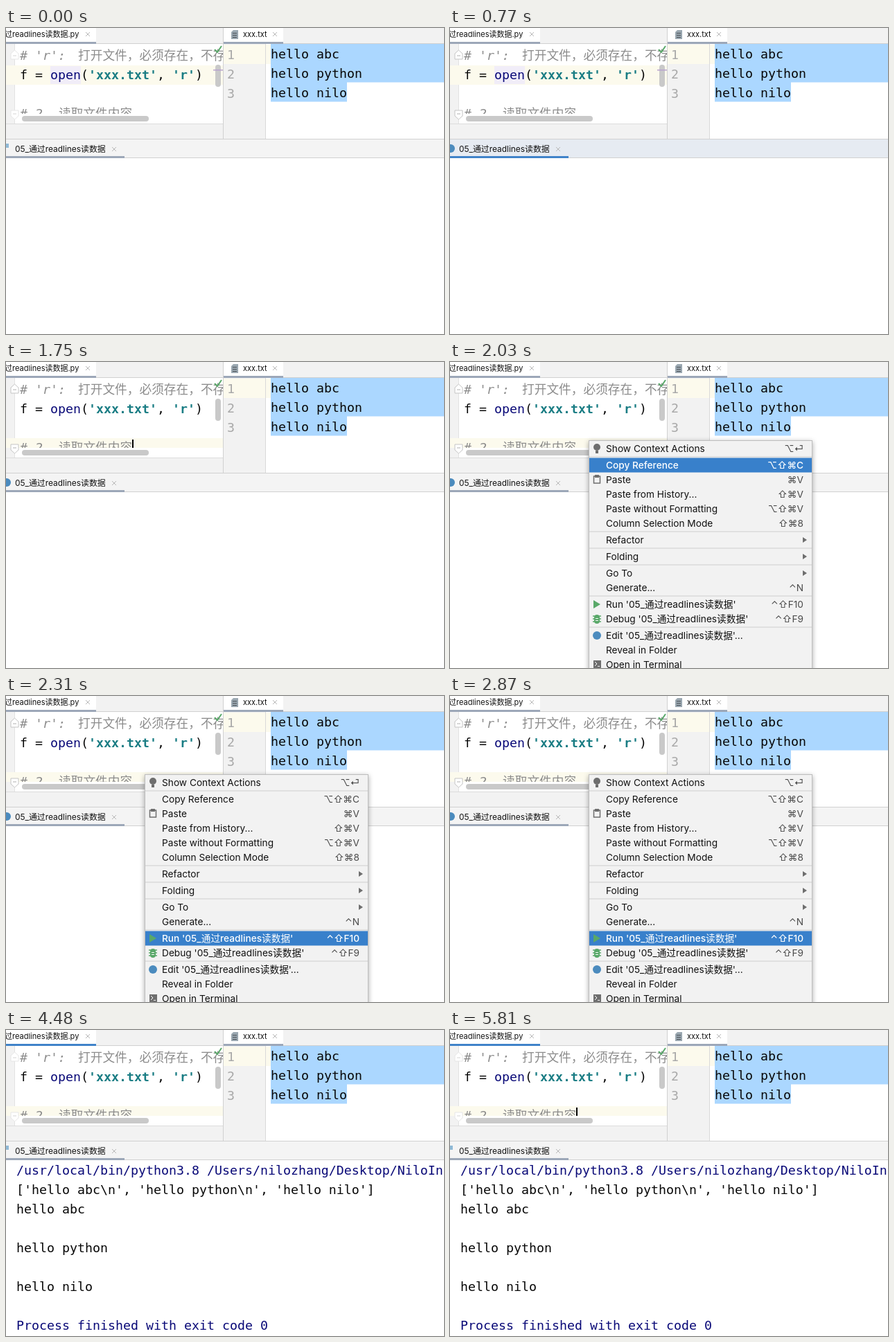
These frames come from a looping animation (632 by 442 pixels, 5880 ms). An HTML page with a canvas:

```html
<!DOCTYPE html>
<html lang="zh-CN">
<head>
<meta charset="utf-8">
<style>
html, body { margin: 0; width: 100%; height: 100%; overflow: hidden; background: #fff; }
canvas { display: block; }
</style>
</head>
<body>
<canvas width="632" height="442"></canvas>
<script>
const ctx = document.querySelector('canvas').getContext('2d');
const LOOP = 5880, STEP = 70;
const MONO = '18.27px "DejaVu Sans Mono", monospace';
const CJK = '17.7px "Noto Sans CJK SC", "Noto Sans CJK", sans-serif';
const ui = size => `${size}px Inter, "Noto Sans CJK SC", "Noto Sans CJK", "DejaVu Sans", sans-serif`;
const BLUE = '#4083c9', GRAY_BLUE = '#9ca7b8', PANEL = '#f2f2f2', LINE = '#d1d1d1';
const YELLOW = '#fcfaed', GREEN = '#59a869', NAVY = '#0a0a78', LOGO = '#4b8bbe';
const STRING = '#1a7d84', SELECTION = '#abd7ff';

const menu = [
  { y: 125, label: 'Show Context Actions', keys: '⌥⏎', icon: 'bulb', rule: true },
  { y: 149, label: 'Copy Reference', keys: '⌥⇧⌘C' },
  { y: 170, label: 'Paste', keys: '⌘V', icon: 'clipboard' },
  { y: 191, label: 'Paste from History...', keys: '⇧⌘V' },
  { y: 212, label: 'Paste without Formatting', keys: '⌥⇧⌘V' },
  { y: 233, label: 'Column Selection Mode', keys: '⇧⌘8', rule: true },
  { y: 257, label: 'Refactor', sub: true, rule: true },
  { y: 281, label: 'Folding', sub: true, rule: true },
  { y: 305, label: 'Go To', sub: true },
  { y: 326, label: 'Generate...', keys: '⌃N', rule: true },
  { y: 350, label: "Run '05_通过readlines读数据'", keys: '⌃⇧F10', icon: 'run' },
  { y: 371, label: "Debug '05_通过readlines读数据'", keys: '⌃⇧F9', icon: 'bug', rule: true },
  { y: 395, label: "Edit '05_通过readlines读数据'...", icon: 'logo' },
  { y: 416, label: 'Reveal in Folder' },
  { y: 437, label: 'Open in Terminal', icon: 'terminal' }
];

function rect(x, y, w, h, color) {
  ctx.fillStyle = color;
  ctx.fillRect(x, y, w, h);
}

function pill(x, y, w, h, r, color) {
  ctx.fillStyle = color;
  ctx.beginPath();
  ctx.roundRect(x, y, w, h, r);
  ctx.fill();
}

function dot(x, y, r, color) {
  ctx.fillStyle = color;
  ctx.beginPath();
  ctx.arc(x, y, r, 0, 7);
  ctx.fill();
}

function path(points, color, width) {
  ctx.beginPath();
  for (const [x, y] of points) ctx.lineTo(x, y);
  if (width) {
    ctx.strokeStyle = color;
    ctx.lineWidth = width;
    ctx.stroke();
  } else {
    ctx.fillStyle = color;
    ctx.fill();
  }
}

function text(str, x, y, font, color, align = 'left') {
  ctx.font = font;
  ctx.fillStyle = color;
  ctx.textAlign = align;
  ctx.fillText(str, x, y);
}

function cross(x, y) {
  path([[x - 3, y - 3], [x + 3, y + 3]], '#b8b8b8', 1);
  path([[x + 3, y - 3], [x - 3, y + 3]], '#b8b8b8', 1);
}

function foldMark(y, up, strong) {
  const d = up ? -1 : 1;
  const shape = [[7, y - 5 * d], [18, y - 5 * d], [18, y + 3 * d], [12.5, y + 8 * d], [7, y + 3 * d], [7, y - 5 * d]];
  path(shape, '#fff');
  path(shape, strong ? '#c4c4c4' : '#e6e6e6', 1);
  path([[10, y], [15, y]], strong ? '#b0b0b0' : '#d4d4d4', 1);
}

function drawTabs(focused) {
  rect(0, 0, 632, 22, PANEL);
  rect(0, 0, 130, 22, '#fff');
  rect(314, 0, 86, 22, '#fff');
  rect(0, 22, 632, 1, LINE);
  rect(0, 20, 130, 3, focused ? BLUE : GRAY_BLUE);
  rect(314, 20, 86, 3, GRAY_BLUE);
  text('过readlines读数据.py', -2, 13, ui(11), '#111');
  cross(118, 9);
  path([[328, 3], [335, 3], [335, 16], [325, 16], [325, 6]], '#9aa7b0');
  for (const y of [7, 10, 13]) rect(327, y, 6, 1, '#4a5157');
  text('xxx.txt', 342, 13, ui(11), '#111');
  cross(388, 9);
}

function drawCode(s) {
  rect(0, 23, 13, 115, PANEL);
  rect(12, 23, 1, 115, '#e3e3e3');
  if (s.moved) rect(0, 110, 313, 14, s.starting ? '#f6f6f4' : YELLOW);
  else {
    rect(0, 54, 313, 28, YELLOW);
    rect(64, 55, 44, 26, '#f1edf8');
  }
  ctx.save();
  ctx.beginPath();
  ctx.rect(0, 23, 313, 101);
  ctx.clip();
  text("# 'r':", 20, 46, 'italic ' + MONO, '#8c8c8c');
  text('打开文件，必须存在，不存', 104, 46, CJK, '#8c8c8c');
  text('f = ', 20, 74, MONO, '#080808');
  text('open', 64, 74, MONO, NAVY);
  text('(', 108, 74, MONO, '#080808');
  text("'xxx.txt'", 119, 74, 'bold ' + MONO, STRING);
  text(',', 218, 74, MONO, '#080808');
  text("'r'", 240, 74, 'bold ' + MONO, STRING);
  text(')', 273, 74, MONO, '#080808');
  text('# 2.', 20, 130, 'italic ' + MONO, '#8c8c8c');
  text('读取文件内容', 76, 130, CJK, '#8c8c8c');
  if (s.caret) rect(182, 112, 2, 12, '#000');
  ctx.restore();
  foldMark(40, true, s.sharp);
  foldMark(124, false, s.sharp);
  pill(23, 127, 183, 8, 4, '#c9c9c9');
  pill(302, 53, 8, 32, 4, '#c9c9c9');
  if (!s.moved) rect(299, 60, 14, 1.5, '#b9a3cf');
  path([[301, 31], [305, 35], [311, 26]], GREEN, 2);
  rect(0, 138, 313, 22, PANEL);
  rect(0, 138, 313, 1, '#dcdcdc');
}

function drawTextFile() {
  rect(314, 23, 60, 137, PANEL);
  rect(314, 24, 68, 28, YELLOW);
  rect(374, 23, 1, 137, '#d9d9d9');
  rect(313, 0, 1, 160, LINE);
  rect(382, 23, 250, 55.5, SELECTION);
  rect(382, 78, 110, 28.5, SELECTION);
  ['abc', 'python', 'nilo'].forEach((word, i) => {
    text(i + 1, 319, 45 + 28 * i, MONO, '#a8a8a8');
    text('hello ' + word, 382, 44 + 28 * i, MONO, '#080808');
  });
}

function drawRunBar(s) {
  rect(0, 160, 632, 28, s.runFocus ? '#e6ebf2' : '#f4f4f4');
  rect(0, 160, 632, 1, LINE);
  rect(0, 187, 632, 1, LINE);
  rect(0, 185, 171, 3, s.runFocus ? BLUE : GRAY_BLUE);
  if (s.sharp) dot(1, 174, 6, LOGO);
  else rect(0, 167, 4, 6, '#8fb9d6');
  text('05_通过readlines读数据', 13, 179, ui(11.9), '#111');
  cross(156, 175);
}

function drawOutput() {
  text('/usr/local/bin/python3.8 /Users/nilozhang/Desktop/NiloIn', 15, 209, MONO, NAVY);
  text("['hello abc\\n', 'hello python\\n', 'hello nilo']", 15, 237, MONO, '#080808');
  ['abc', 'python', 'nilo'].forEach((word, i) => text('hello ' + word, 15, 265 + 56 * i, MONO, '#080808'));
  text('Process finished with exit code 0', 15, 433, MONO, NAVY);
}

const icons = {
  bulb(y) {
    dot(212, y - 2, 5, '#6e6e6e');
    rect(210, y + 3, 4, 4, '#6e6e6e');
  },
  clipboard(y) {
    ctx.strokeStyle = '#6e6e6e';
    ctx.lineWidth = 1.5;
    ctx.strokeRect(207.5, y - 5, 9, 10);
    rect(209, y - 7, 6, 4, '#6e6e6e');
  },
  run(y) {
    path([[207, y - 6], [217, y], [207, y + 6]], GREEN);
  },
  bug(y) {
    for (const dy of [-4, 0, 4]) path([[206, y + dy], [218, y + dy]], GREEN, 1.5);
    pill(208, y - 6, 8, 13, 4, GREEN);
    rect(210, y - 1, 4, 1, '#fff');
    rect(210, y + 2, 4, 1, '#fff');
  },
  logo(y) {
    dot(212, y, 6, LOGO);
  },
  terminal(y) {
    rect(207, y - 6, 11, 11, '#6e6e6e');
    path([[209, y - 4], [212, y - 1], [209, y + 2]], '#fff', 1);
    rect(213, y + 2, 3, 1, '#fff');
  }
};

function drawMenu(active) {
  ctx.save();
  ctx.shadowColor = 'rgba(0,0,0,.35)';
  ctx.shadowBlur = 7;
  ctx.shadowOffsetY = 2;
  rect(200, 113, 323, 340, '#bdbdbd');
  ctx.restore();
  rect(201, 114, 321, 340, PANEL);
  menu.forEach((item, i) => {
    const { y, label, keys, icon, sub, rule } = item;
    const on = i === active;
    const font = (on ? '500 ' : '') + ui(13.7);
    if (rule) rect(201, y + 11.5, 321, 1, '#d0d0d0');
    if (on) rect(201, y - 10.5, 321, 21, '#3880cb');
    if (icon) icons[icon](y);
    text(label, 225, y + 5, font, on ? '#fff' : '#111');
    if (keys) text(keys, 510, y + 5, font, on ? '#fff' : '#4a4a4a', 'right');
    if (sub) path([[509, y - 4], [515, y], [509, y + 4]], '#6e6e6e');
  });
}

function hoveredItem(t) {
  const progress = Math.min(1, Math.max(0, (t - 2030) / 280));
  return Math.round(1 + 9 * progress);
}

function draw(t) {
  const within = (from, to) => t >= from && t < to;
  const menuOpen = within(1820, 3430);
  const state = {
    moved: t >= 1050,
    sharp: within(560, 3430),
    runFocus: within(560, 1610),
    starting: within(3430, 3850),
    caret: within(1050, 1820) || within(3430, 4060) || within(4550, 5040) || t >= 5530
  };
  rect(0, 0, 632, 442, '#fff');
  drawTabs(t >= 3430);
  drawCode(state);
  drawTextFile();
  drawRunBar(state);
  if (t >= 3850) drawOutput();
  if (menuOpen) drawMenu(hoveredItem(t));
}

function tick() {
  const t = performance.now() % LOOP;
  draw(Math.floor(t / STEP) * STEP);
  requestAnimationFrame(tick);
}
tick();
</script>
</body>
</html>
```
